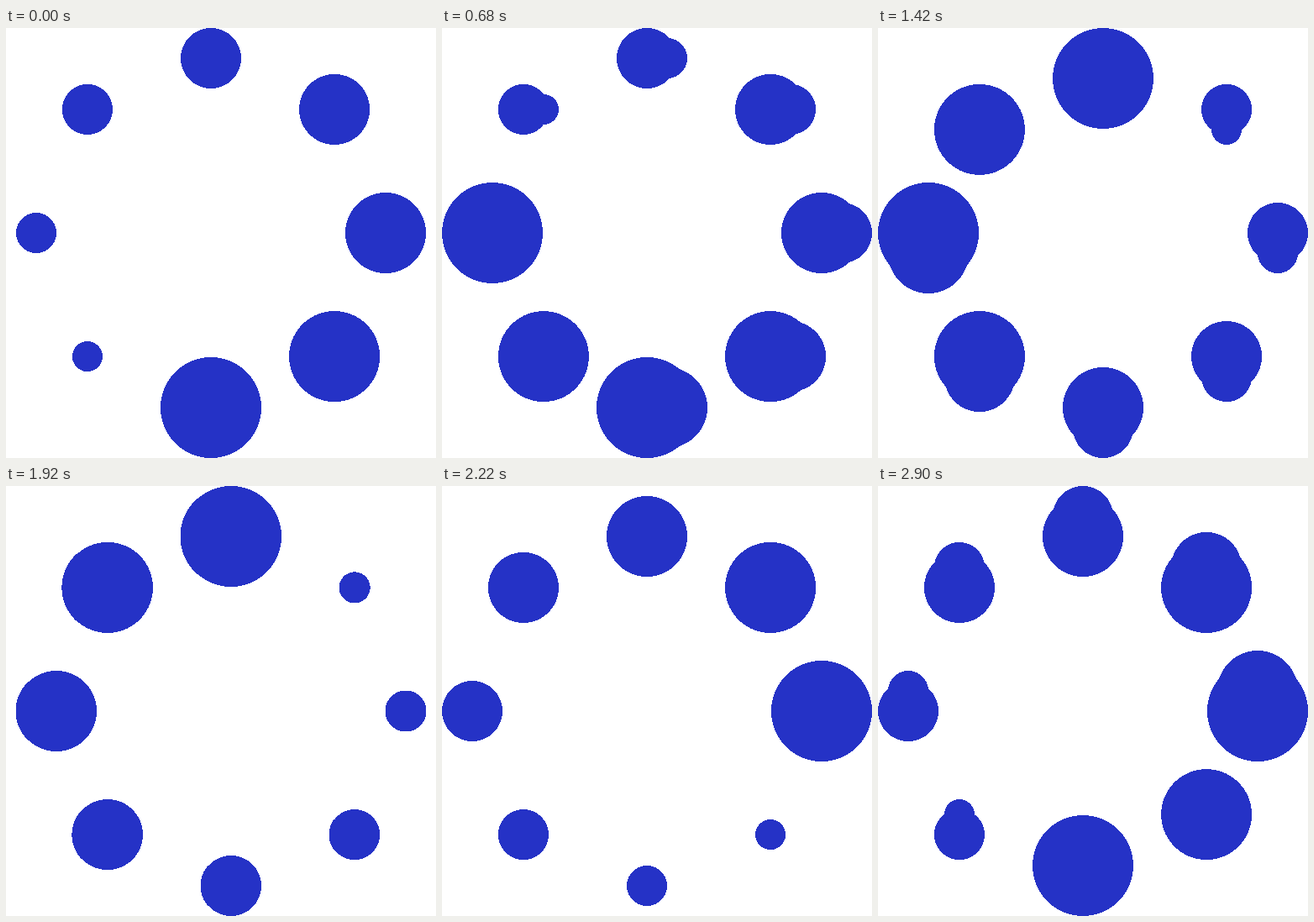
Recreate the animation shown at these times as an HTML page with a canvas. Size 512 by 512 pixels, loop 2.96 s.

```html
<!DOCTYPE html>
<html lang="en">
<head>
<meta charset="utf-8">
<title>Dot spinner</title>
<style>
  html, body { margin: 0; width: 100%; height: 100%; overflow: hidden; background: #fff; }
  canvas { display: block; width: 100vmin; height: 100vmin; }
</style>
</head>
<body>
<canvas id="stage" width="512" height="512"></canvas>
<script>
const SIZE = 512;
const HOLD = 200, STEP = 60, STEPS = 9;
const TURN = HOLD + STEP * STEPS; // one quarter turn
const BLUE = [37, 50, 198];

const ctx = document.getElementById('stage').getContext('2d');
const image = ctx.createImageData(SIZE, SIZE);
const pixels = new Uint32Array(image.data.buffer);
const pack = (r, g, b) => new Uint32Array(new Uint8Array([r, g, b, 255]).buffer)[0];
const ink = pack(...BLUE), paper = pack(255, 255, 255);

// Soft-edged disc coverage, 0 to 1 per pixel
function addDisc(map, cx, cy, r) {
  const clip = v => Math.max(0, Math.min(SIZE - 1, Math.floor(v)));
  for (let y = clip(cy - r - 1); y <= clip(cy + r + 1); y++) {
    for (let x = clip(cx - r - 1); x <= clip(cx + r + 1); x++) {
      const c = r + 0.5 - Math.hypot(x + 0.5 - cx, y + 0.5 - cy);
      const i = y * SIZE + x;
      map[i] = Math.max(map[i], Math.min(1, c));
    }
  }
}

function ring() {
  const map = new Float32Array(SIZE * SIZE);
  for (let i = 0; i < 8; i++) {
    const a = (3 + i) * Math.PI / 4;
    addDisc(map, 244 + 208 * Math.cos(a), 244 + 208 * Math.sin(a), 18 + 6 * i);
  }
  return map;
}

// Clockwise quarter turn of the whole stage
function rotate(map) {
  const out = new Float32Array(map.length);
  for (let y = 0; y < SIZE; y++) {
    for (let x = 0; x < SIZE; x++) {
      out[y * SIZE + x] = map[(SIZE - 1 - x) * SIZE + y];
    }
  }
  return out;
}

const poses = [ring()];
while (poses.length < 4) poses.push(rotate(poses[poses.length - 1]));

// Lay the next pose over the current one, then keep only solid pixels
function draw(turn, mix) {
  const base = poses[turn], over = poses[(turn + 1) % 4];
  for (let i = 0; i < pixels.length; i++) {
    const alpha = 1 - (1 - base[i]) * (1 - over[i] * mix);
    pixels[i] = alpha > 0.501 ? ink : paper;
  }
  ctx.putImageData(image, 0, 0);
}

let shown = -1;
const start = performance.now();

function frame() {
  const t = Math.max(0, performance.now() - start) % (TURN * 4);
  const turn = Math.floor(t / TURN);
  const step = Math.max(0, Math.floor((t % TURN - HOLD) / STEP) + 1);
  const key = turn * 10 + step;
  if (key !== shown) {
    shown = key;
    draw(turn, step / (STEPS + 1));
  }
  requestAnimationFrame(frame);
}
frame();
</script>
</body>
</html>
```
